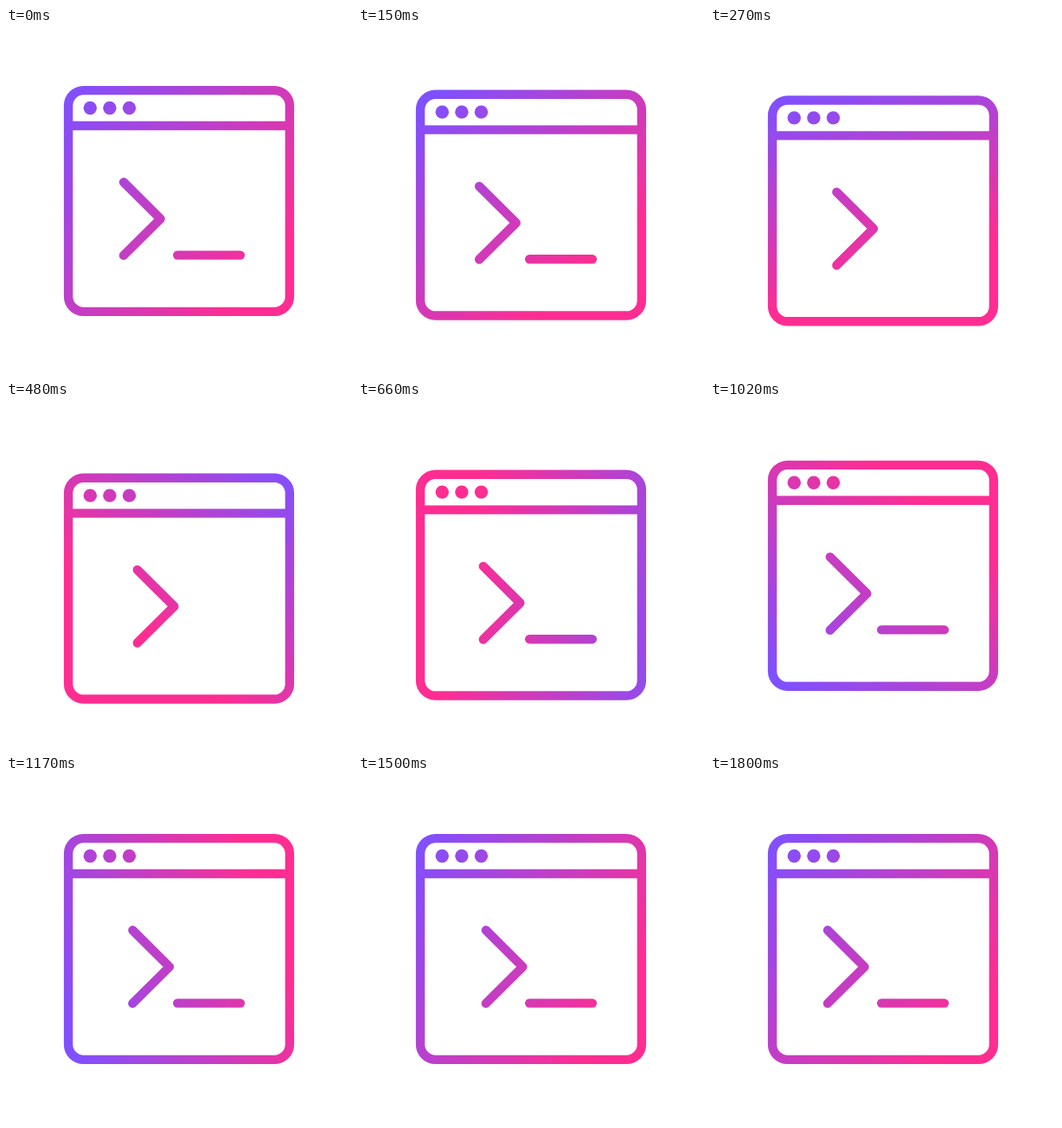
Recreate the animation shown at these times as an HTML page with a canvas. Size 400 by 400 pixels, loop 3.83 s.

```html
<!DOCTYPE html>
<html lang="en">
<head>
<meta charset="utf-8">
<title>Terminal icon</title>
<style>
  html, body { margin: 0; width: 100%; height: 100%; overflow: hidden; background: #fff; }
  canvas { display: block; width: 400px; height: 400px; }
</style>
</head>
<body>
<canvas id="stage" width="400" height="400"></canvas>
<script>
const ctx = document.getElementById('stage').getContext('2d');
const LOOP = 3830, MOVE_END = 1800, STEP = 30;
const VIOLET = '#7f50ff', PINK = '#ff2d91';

// Gradient pose over time: [ms, angle in degrees, length, blend at the centre]
const POSES = [
  [0, 38.7, 312, 0.576],
  [270, 70.7, 236, 0.647],
  [660, 191.3, 280, 0.72],
  [870, 270, 270, 0.705],
  [1170, 339, 275, 0.58],
  [1500, 390.4, 297, 0.589],
  [1800, 398.7, 312, 0.576]
];

// Cubic ease in and out, bezier (1/3, 0, 2/3, 1)
function ease(x) {
  x = Math.min(1, Math.max(0, x));
  return x * x * (3 - 2 * x);
}

// Out to 1 at peak, back to 0 at end
function swing(t, peak, end) {
  return t < peak ? ease(t / peak) : 1 - ease((t - peak) / (end - peak));
}

function slope(i, k) {
  const a = POSES[i - 1], b = POSES[i + 1];
  return a && b ? (b[k] - a[k]) / (b[0] - a[0]) : 0;
}

// Smooth curve through one column of POSES
function pose(t, k) {
  let i = 0;
  while (i < POSES.length - 2 && t >= POSES[i + 1][0]) i++;
  const a = POSES[i], b = POSES[i + 1];
  const d = b[0] - a[0], u = (t - a[0]) / d, v = 1 - u;
  return a[k] * (1 + 2 * u) * v * v + b[k] * u * u * (3 - 2 * u)
    + d * u * v * (slope(i, k) * v - slope(i + 1, k) * u);
}

function makeGradient(t) {
  const angle = pose(t, 1) * Math.PI / 180, len = pose(t, 2), mid = pose(t, 3);
  const at = s => [200 + Math.cos(angle) * len * s, 200 + Math.sin(angle) * len * s];
  const g = ctx.createLinearGradient(...at(-mid), ...at(1 - mid));
  g.addColorStop(0, VIOLET);
  g.addColorStop(1, PINK);
  return g;
}

function line(...points) {
  ctx.beginPath();
  points.forEach(([x, y]) => ctx.lineTo(x, y));
  ctx.stroke();
}

function draw(t) {
  const dy = 16 * swing(t, 420, 1115);
  const dx = 16 * swing(t % 900, 450, 900);
  const cursorOn = t >= 1500 || Math.floor(t / 250) % 2 === 0;

  ctx.fillStyle = '#fff';
  ctx.fillRect(0, 0, 400, 400);
  ctx.fillStyle = ctx.strokeStyle = makeGradient(t);
  ctx.lineWidth = 10.4;
  ctx.lineJoin = 'round';

  ctx.lineCap = 'butt';
  ctx.beginPath();
  ctx.roundRect(72.1, 72.1 + dy, 255.8, 255.8, 17.5);
  ctx.stroke();
  line([72, 113 + dy], [328, 113 + dy]);

  for (let i = 0; i < 3; i++) {
    ctx.beginPath();
    ctx.arc(97.3 + i * 22.6, 92.5 + dy, 7.7, 0, 2 * Math.PI);
    ctx.fill();
  }

  ctx.lineCap = 'round';
  line([136 + dx, 178.3 + dy], [178.6 + dx, 220.6 + dy], [136 + dx, 262.9 + dy]);
  if (cursorOn) line([198.2, 262.6 + dy], [270.9, 262.6 + dy]);
}

const start = performance.now();
function tick() {
  const t = (performance.now() - start) % LOOP;
  draw(Math.min(MOVE_END, Math.floor(t / STEP) * STEP));
  requestAnimationFrame(tick);
}
tick();
</script>
</body>
</html>
```
